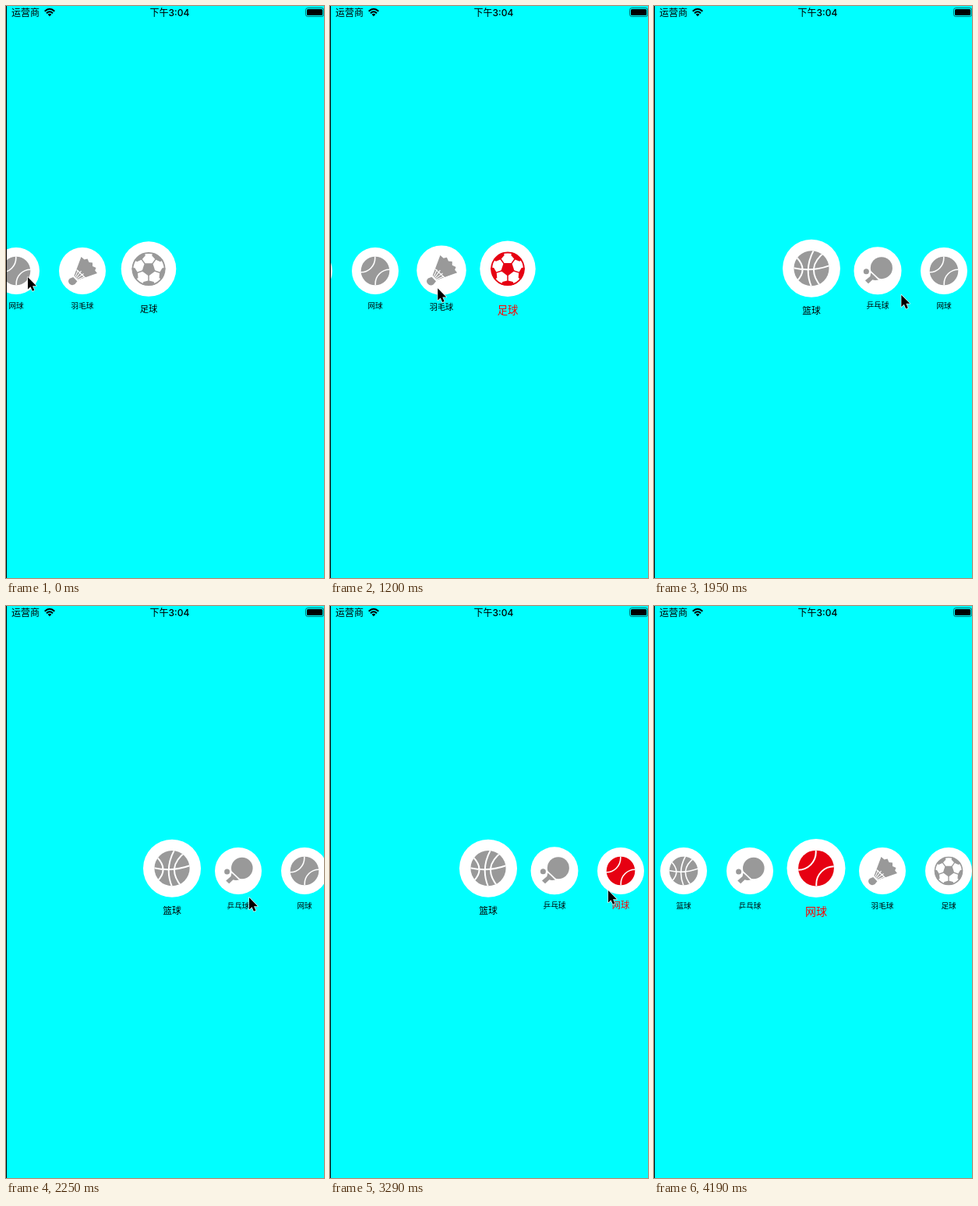
An HTML page that plays this animation: 408 px wide and 732 px high, repeating every 4940 ms.

```html
<!DOCTYPE html>
<html lang="zh-CN">
<head>
<meta charset="utf-8">
<style>
html, body { margin: 0; height: 100%; overflow: hidden; background: #0ff; }
svg { display: block; width: 100vw; height: 100vh; }
text { font-family: Inter, "Noto Sans CJK SC", "Noto Sans CJK", sans-serif; }
.cut { fill: none; stroke: #fff; stroke-width: 1.6; }
</style>
</head>
<body>
<svg id="stage" viewBox="0 0 408 732">
  <defs>
    <clipPath id="ball"><circle r="18.3"/></clipPath>
    <g id="basket">
      <circle r="18.3" fill="currentColor"/>
      <g class="cut" clip-path="url(#ball)">
        <path d="M-19 -.5Q0 4 19 -3M2.5 -19Q-8 0 0 19M-16-12Q-3 1-15 13M14-17Q-7-1 10 19"/>
      </g>
    </g>
    <g id="pingpong" fill="currentColor">
      <circle cx="4.8" cy="-3.5" r="13.8"/>
      <circle cx="-14.4" cy="1" r="3.5"/>
      <path d="M-8.5 2.5L1 11.5Q-4 12.5-6.5 11.2L-11.8 16.2L-15.8 12.4L-9.5 7Z"/>
      <path class="cut" d="M-10.5 -.5L3 12.2" stroke-width="1.4"/>
    </g>
    <g id="tennis">
      <circle r="18.3" fill="currentColor"/>
      <g class="cut" clip-path="url(#ball)">
        <circle cx="-18.4" cy="-16.4" r="18.2"/>
        <circle cx="18.4" cy="16.4" r="18.2"/>
      </g>
    </g>
    <g id="shuttle" fill="currentColor">
      <path d="M-1.5-18L2.5-14.5L6.5-15.5L8.5-11L13-10.5L13-6L17.5-4L16.2-.5L19 3L-5.2 11.6L-10.6 6.2Z"/>
      <path d="M-11.8 8L-6.6 13.2L-9.6 17Q-13.5 19.6-16.6 16.4Q-19.5 13-16.2 9.8Z"/>
      <path class="cut" style="stroke-width:1.1" d="M-9 7L-5.5-1M-7.8 8.4L-1.5 0M-6.6 9.6L1.5 3.5M-5.6 11L2.5 7.4M-7.5-1.5L4.5 9.5"/>
    </g>
    <g id="soccer">
      <circle r="17.5" fill="none" stroke="currentColor" stroke-width="1.6"/>
      <g id="patches" clip-path="url(#ball)" fill="currentColor" stroke="currentColor"></g>
    </g>
  </defs>
  <rect width="408" height="732" fill="#0ff"/>
  <g font-size="12">
    <text x="7" y="13">运营商</text>
    <text x="210" y="13" text-anchor="middle" font-weight="500">下午3:04</text>
  </g>
  <g fill="none" stroke="#000" stroke-width="2">
    <path d="M49.7 6.7Q56 .8 62.3 6.7M52 9.2Q56 5.4 60 9.2"/>
    <path d="M56 13.2L53.6 10.8Q56 8.8 58.4 10.8Z" fill="#000" stroke="none"/>
    <rect x="384.5" y="2.5" width="23.2" height="11" rx="2.8" stroke-width="1" opacity=".55"/>
    <rect x="386" y="4" width="20.2" height="8" rx="1.5" fill="#000" stroke="none"/>
  </g>
  <g id="row"></g>
  <rect width="1" height="732"/>
  <path id="pointer" d="M0 0V15.4L3.5 12.2L5.9 17.8L8.5 16.7L6.1 11.2H11Z" stroke="#fff" stroke-width="1.3" paint-order="stroke" stroke-linejoin="round"/>
</svg>
<script>
const LOOP = 4940, GAP = 85, MID = 208, AXIS = 353;
const sports = [["basket", "篮球"], ["pingpong", "乒乓球"], ["tennis", "网球"], ["shuttle", "羽毛球"], ["soccer", "足球"]];

// time, x of the first item
const scroll = [
  [0, -157], [150, -144], [300, -136], [450, -132], [1050, -132], [1200, -112],
  [1650, 78], [1800, 150], [1950, 202], [2100, 218], [2250, 213], [2400, 209.5],
  [2550, 208], [3140, 208], [3290, 203], [3440, 80], [3590, 38]
];
// time, x, y of the pointer tip
const pointer = [
  [0, 28, 347], [450, 57, 355], [1050, 85, 360], [1650, 298, 365], [1800, 320, 368],
  [2250, 312, 373], [2850, 357, 358], [3290, 357, 364], [3590, 355, 416], [4040, 350, 711], [4190, 350, 780]
];

function sample(keys, t, k = 1) {
  const i = keys.findIndex(p => p[0] > t);
  if (i < 0) return keys[keys.length - 1][k];
  const a = keys[i - 1], b = keys[i];
  return a[k] + (b[k] - a[k]) * (t - a[0]) / (b[0] - a[0]);
}

// the picture advances in steps
function step(t) {
  return t < 2990 ? Math.floor(t / 150) * 150 : 2990 + 150 * Math.min(8, Math.floor((t - 2990) / 150));
}

function selected(t) {
  if (t < 600) return -1;
  if (t < 2550) return 4;
  return t < 3290 ? 0 : 2;
}

const $ = id => document.getElementById(id);
const polar = (r, deg) => [r * Math.cos(deg * Math.PI / 180), r * Math.sin(deg * Math.PI / 180)].map(v => v.toFixed(2)).join(" ");

function soccerPatches() {
  let core = "M", out = "";
  for (let i = 0; i < 5; i++) {
    const a = 90 + 72 * i;
    core += polar(7.6, a) + (i < 4 ? "L" : "Z");
    out += `<path d="M${polar(7, a)}L${polar(13, a)}" stroke-width="1.3"/>
      <path d="M${polar(12.6, a)}L${polar(15, a + 22)}L${polar(19, a + 22)}L${polar(19, a - 22)}L${polar(15, a - 22)}Z" stroke="none"/>`;
  }
  $("patches").innerHTML = `<path d="${core}" stroke="none"/>` + out;
}

soccerPatches();
$("row").innerHTML = sports.map(([icon, name]) => `<g>
  <circle cy="-14" r="30" fill="#fff"/>
  <use href="#${icon}" y="-14"/>
  <text text-anchor="middle">${name}</text></g>`).join("");
const items = [...$("row").children];

function draw(time) {
  const t = step(time), x0 = sample(scroll, t), on = selected(t);
  items.forEach((g, i) => {
    const x = x0 + i * GAP, red = i === on, size = red ? 11.2 : 9.6;
    const scale = 1.25 - 0.25 * Math.min(1, Math.abs(x - MID) / GAP);
    g.setAttribute("transform", `translate(${x} ${AXIS}) scale(${scale})`);
    g.setAttribute("color", red ? "#e60012" : "#999");
    const label = g.lastElementChild;
    label.setAttribute("font-size", size);
    label.setAttribute("y", 30 + size * 0.37);
    label.setAttribute("fill", red ? "#f00" : "#000");
  });
  $("pointer").setAttribute("transform", `translate(${sample(pointer, t)} ${sample(pointer, t, 2)})`);
}

const start = performance.now();
function tick() {
  draw((performance.now() - start) % LOOP);
  requestAnimationFrame(tick);
}
tick();
</script>
</body>
</html>
```
